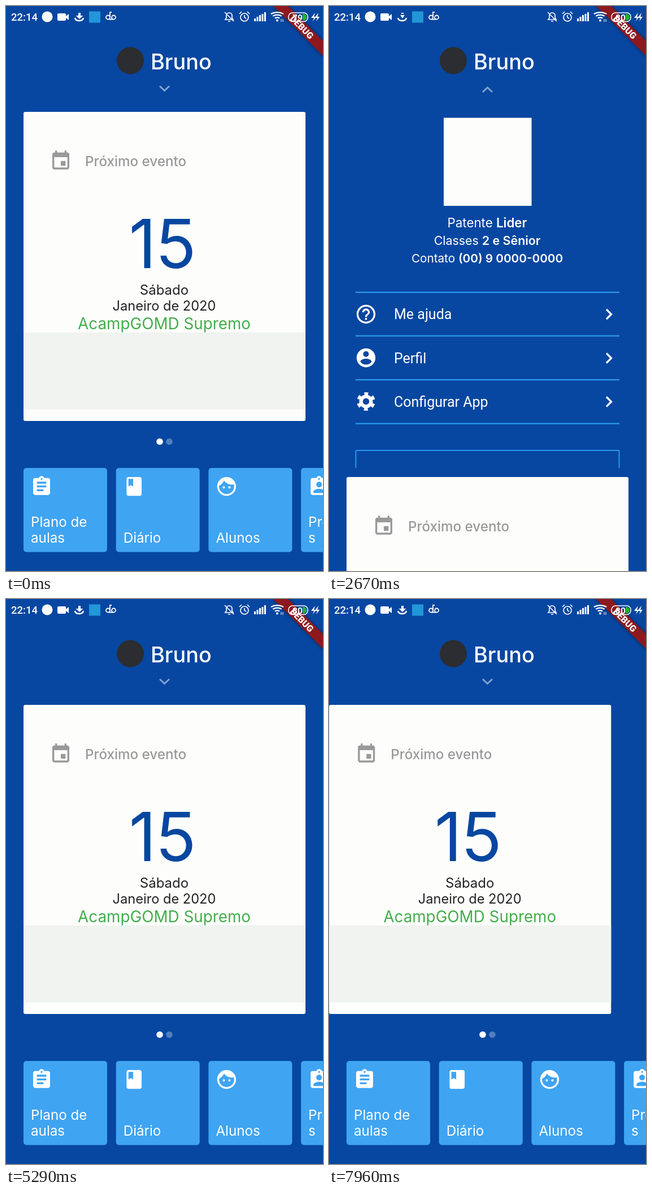
Write an HTML page that moves like this. It is 561x998 px and loops after 8 s.

```html
<!DOCTYPE html>
<html lang="pt-BR">
<head>
<meta charset="utf-8">
<title>Agenda</title>
<style>
  html, body { margin: 0; width: 100%; height: 100%; overflow: hidden; background: #0747a1; }
  svg { display: block; width: 100vw; height: 100vh; }
  text { font-family: Inter, sans-serif; }
  .roboto { font-family: Roboto, sans-serif; }
  .line { fill: none; stroke: #fff; }
  .mid { text-anchor: middle; }
</style>
</head>
<body>
<svg id="stage" viewBox="0 0 561 998"></svg>
<script>
const LOOP = 8000, PAGE = 561, DROP = 645;

const disc = 'M12 2C6.48 2 2 6.48 2 12s4.48 10 10 10 10-4.48 10-10S17.52 2 12 2z';
const clip = 'M19 3h-4.18C14.4 1.84 13.3 1 12 1c-1.3 0-2.4.84-2.82 2H5c-1.1 0-2 .9-2 2v14c0 1.1.9 2 2 2h14c1.1 0 2-.9 2-2V5c0-1.1-.9-2-2-2zm-7 0c.55 0 1 .45 1 1s-.45 1-1 1-1-.45-1-1 .45-1 1-1z';
const paths = {
  event: 'M17 12h-5v5h5v-5zM16 1v2H8V1H6v2H5c-1.1 0-2 .9-2 2v14c0 1.1.9 2 2 2h14c1.1 0 2-.9 2-2V5c0-1.1-.9-2-2-2h-1V1h-2zm3 18H5V8h14v11z',
  money: disc + 'm1.41 16.09V20h-2.67v-1.93c-1.71-.36-3.16-1.46-3.27-3.4h1.96c.1 1.05.82 1.87 2.65 1.87 1.96 0 2.4-.98 2.4-1.59 0-.83-.44-1.61-2.67-2.14-2.48-.6-4.18-1.62-4.18-3.67 0-1.72 1.39-2.84 3.11-3.21V4h2.67v1.95c1.86.45 2.79 1.86 2.85 3.39H14.3c-.05-1.11-.64-1.87-2.22-1.87-1.5 0-2.4.68-2.4 1.64 0 .84.65 1.39 2.67 1.91s4.18 1.39 4.18 3.91c-.01 1.83-1.38 2.83-3.12 3.16z',
  plan: clip + 'm2 14H7v-2h7v2zm3-4H7v-2h10v2zm0-4H7V7h10v2z',
  teacher: clip + 'm0 4c1.66 0 3 1.34 3 3s-1.34 3-3 3-3-1.34-3-3 1.34-3 3-3zm6 12H6v-1.4c0-2 4-3.1 6-3.1s6 1.1 6 3.1V19z',
  book: 'M18 2H6c-1.1 0-2 .9-2 2v16c0 1.1.9 2 2 2h12c1.1 0 2-.9 2-2V4c0-1.1-.9-2-2-2zM6 4h5v8l-2.5-1.5L6 12V4z',
  face: disc + 'm0 18c-4.41 0-8-3.59-8-8 0-.29.02-.58.05-.86 2.36-1.05 4.23-2.98 5.21-5.37C11.07 8.33 14.05 10 17.42 10c.78 0 1.53-.09 2.25-.26.21.71.33 1.47.33 2.26 0 4.41-3.59 8-8 8zM7.75 13a1.25 1.25 0 1 0 2.5 0 1.25 1.25 0 1 0-2.5 0zm6 0a1.25 1.25 0 1 0 2.5 0 1.25 1.25 0 1 0-2.5 0z',
  help: 'M11 18h2v-2h-2v2z' + disc + 'm0 18c-4.41 0-8-3.59-8-8s3.59-8 8-8 8 3.59 8 8-3.59 8-8 8zm0-14c-2.21 0-4 1.79-4 4h2c0-1.1.9-2 2-2s2 .9 2 2c0 2-3 1.75-3 5h2c0-2.25 3-2.5 3-5 0-2.21-1.79-4-4-4z',
  user: disc + 'm0 3c1.66 0 3 1.34 3 3s-1.34 3-3 3-3-1.34-3-3 1.34-3 3-3zm0 14.2c-2.5 0-4.71-1.28-6-3.22.03-1.99 4-3.08 6-3.08 1.99 0 5.97 1.09 6 3.08-1.29 1.94-3.5 3.22-6 3.22z'
};

const rect = (x, y, w, h, fill, r = 0) => `<rect x="${x}" y="${y}" width="${w}" height="${h}" rx="${r}" fill="${fill}"/>`;
const circle = (x, y, r, fill, attrs = '') => `<circle cx="${x}" cy="${y}" r="${r}" fill="${fill}" ${attrs}/>`;
const text = (s, x, y, size, fill = '#fff', attrs = '') => `<text x="${x}" y="${y}" font-size="${size}" fill="${fill}" ${attrs}>${s}</text>`;
const mid = (s, y, size, fill, x = 280) => text(s, x, y, size, fill, 'class="mid"');
const line = (d, width = 2) => `<path class="line" d="${d}" stroke-width="${width}"/>`;
const at = (x, y, body) => `<g transform="translate(${x - 20} ${y - 20}) scale(1.667)">${body}</g>`;
const icon = (name, x, y, fill = '#fff') => at(x, y, `<path fill-rule="evenodd" d="${paths[name]}" fill="${fill}"/>`);
const gear = at(65.5, 698.5,
  '<circle class="line" cx="12" cy="12" r="5.3" stroke-width="3.8"/>' +
  '<circle class="line" cx="12" cy="12" r="8.3" stroke-width="3" stroke-dasharray="4.1 4.59" stroke-dashoffset="-2.3"/>');

const page = (x, bandY, body) => `<g transform="translate(${x})">
  ${rect(31, 187, 499, 546, '#fdfefc', 3)}${rect(31, bandY, 499, 136, '#f1f3f0')}${body}</g>`;

const cardTitle = (s, y) => text(s, 140, y, 24.2, '#999', 'font-weight="500"');

const cards = page(0, 576.5,
    icon('event', 97, 273.7, '#999') + cardTitle('Próximo evento', 283) +
    mid('15', 463, 119, '#0747a1', 277) +
    mid('Sábado', 510, 24, '#222') + mid('Janeiro de 2020', 538, 23.6, '#222') +
    mid('AcampGOMD Supremo', 571, 27.8, '#45ad4c')) +
  page(PAGE, 458, icon('money', 97.5, 392, '#999') + cardTitle('Caixa', 402));

const tile = (i, name, ...label) => {
  const x = 31 + i * 163.7;
  return rect(x, 816, 148, 148.5, '#3fa4f2', 5) + icon(name, x + 32, 848.7) +
    label.map((s, k) => text(s, x + 13, 948 - 28 * (label.length - 1 - k), 24.2)).join('');
};
const tiles = tile(0, 'plan', 'Plano de', 'aulas') + tile(1, 'book', 'Diário') +
  tile(2, 'face', 'Alunos') + tile(3, 'teacher', 'Professore', 's');

const info = (label, value, y, size) => mid(`${label} <tspan font-weight="600">${value}</tspan>`, y, size, '#fff');
const row = (label, art, y) => art + text(label, 115, y + 9, 25, '#fff', 'class="roboto"') +
  line(`M491 ${y - 8}l8.5 8.5-8.5 8.5`, 3.3);
const rule = y => rect(47, y, 467, 2.4, '#2a97ea');

const menu = rect(203, 197.5, 155.5, 155.5, '#fdfefc') +
  '<rect id="glow" x="203" y="197.5" width="155.5" height="33"/>' +
  info('Patente', 'Lider', 391, 22.3) + info('Classes', '2 e Sênior', 422, 21.4) +
  info('Contato', '(00) 9 0000-0000', 453, 20.7) +
  [504.5, 581.5, 659, 736.5].map(rule).join('') +
  row('Me ajuda', icon('help', 65.5, 544.3), 544) +
  row('Perfil', icon('user', 65.5, 621.5), 621.5) +
  row('Configurar App', gear, 698.5) +
  '<path d="M47.5 816V787q0-2 2-2H511.5q2 0 2 2V816" fill="none" stroke="#2a97ea" stroke-width="2"/>';

const bars = [5, 8, 11, 13, 16].map((h, i) => rect(439 + i * 4.5, 27 - h, 3, h, '#fff')).join('');
const arc = r => `M${480 - r * .7} ${26 - r * .75}Q480 ${26 - r * 1.12} ${480 + r * .7} ${26 - r * .75}`;
const status = text('22:14', 9, 26, 18.5, '#fff', 'class="roboto" font-weight="500"') +
  circle(73, 19, 9.5, '#fff') +
  rect(91, 13, 15, 13, '#fff', 2) + '<path d="M106 18l5-4v11l-5-4z" fill="#fff"/>' +
  line('M122 21q1 5 7.5 5t7.5-5', 2.6) +
  '<path id="arrow" fill="#fff"/>' +
  rect(147, 9.5, 20, 20, '#2196d8') +
  line('M184 20a3.5 3.5 0 1 0-7 0 3.5 3.5 0 1 0 7 0M194 20a3.5 3.5 0 1 0-7 0 3.5 3.5 0 1 0 7 0M180 23.5h11M184 20v-9h3', 1.8) +
  line('M388 24h14l-2-3v-5q-1-4-5-4t-5 4v5zM393 27h4M387 11l16 16', 1.7) +
  line('M429 20a7 7 0 1 0-14 0 7 7 0 1 0 14 0M422 16v4l3 2M413 14l4-4M431 14l-4-4', 1.7) +
  bars + line(arc(6) + arc(11) + arc(16), 2.3) + circle(480, 25.5, 2, '#fff') +
  line('M487 23v5m3-5v5', 1) +
  '<rect class="line" x="500" y="12" width="34" height="15.5" rx="7" stroke-width="1.6"/>' +
  '<path d="M525 14h2q5 1 5 5.7t-5 5.7h-2z" fill="#21b526"/>' +
  text('', 507, 25.5, 15.5, '#fff', 'id="charge" class="roboto" font-weight="700"') +
  '<path d="M547 12l-7 9h5l-2 6 6-8h-4zM553 12l-7 9h5l-2 6 6-8h-4z" fill="#fff"/>';

const ribbon = `<g transform="translate(561 0) rotate(45)">
  <rect x="-64" y="43.6" width="128" height="18.7" filter="url(#blur)" opacity=".5"/>
  ${rect(-64, 43.6, 128, 18.7, '#8d191e')}
  ${text('DEBUG', 0, 58.6, 15.9, '#fff', 'class="roboto mid" font-weight="900"')}</g>`;

document.getElementById('stage').innerHTML = `
  <defs><filter id="blur" x="-20%" y="-60%" width="140%" height="220%"><feGaussianBlur stdDeviation="3"/></filter></defs>
  ${rect(0, 0, 561, 998, '#0747a1')}
  ${circle(220, 96.5, 24, '#2b2d31')}
  ${text('Bruno', 256, 112, 37.8, '#fff', 'font-weight="500"')}
  <path id="chevron" class="line" stroke-width="3" opacity=".5"/>
  <g id="menu">${menu}</g>
  <g id="footer">${circle(272, 769.5, 5.8, '#fff', 'id="dot0"')}${circle(289, 769.5, 5.8, '#fff', 'id="dot1"')}${tiles}</g>
  <g id="cards">${cards}</g>
  ${ribbon}${status}`;

const el = Object.fromEntries([...document.querySelectorAll('[id]')].map(e => [e.id, e]));
const clamp = v => Math.max(0, Math.min(1, v));
const ramp = (t, start, length) => clamp((t - start) / length);
const easeOut = p => 1 - (1 - p) ** 3;
const pulse = (t, ease, length) => ease(ramp(t, 2220, length)) - ease(ramp(t, 4790, length));

// Horizontal page position: [time, pixels]
const pan = [[0, 0], [6040, 0], [6200, 45], [6300, 130], [6400, 285], [6500, 430], [6600, 505], [6700, 537],
  [6790, 550], [6900, 558], [7000, 561], [7350, 561], [7500, 480], [7600, 330], [7700, 190], [7800, 100],
  [7900, 48], [7960, 31], [8000, 22]];

function valueAt(keys, t) {
  const i = Math.max(1, keys.findIndex(k => k[0] >= t));
  const [[t0, a], [t1, b]] = [keys[i - 1], keys[i]];
  return a + (b - a) * (t - t0) / (t1 - t0);
}

const arrows = ['M128 12h4v5h4.5l-6.5 6-6.5-6h4.5z', 'M128 12h4v2h-4zM126 16h8l-4 6z'];

function render(t) {
  const shade = pulse(t, p => p, 200);
  const open = t >= 2220 && t < 4790;
  el.cards.setAttribute('transform', `translate(${-valueAt(pan, t)} ${DROP * pulse(t, easeOut, 300)})`);
  el.menu.setAttribute('opacity', shade);
  el.footer.setAttribute('opacity', 1 - shade);
  el.chevron.setAttribute('d', open ? 'M272 152l8.5-8 8.5 8' : 'M272 141.5l8.5 8 8.5-8');
  const second = ramp(t, 6400, 120) - ramp(t, 7640, 120);
  el.dot0.setAttribute('opacity', 1 - .7 * second);
  el.dot1.setAttribute('opacity', .3 + .7 * second);
  el.glow.setAttribute('opacity', .05 * (ramp(t, 4150, 150) - ramp(t, 4430, 200)));
  el.arrow.setAttribute('d', arrows[Math.floor((t + 50) / 200) % 6 === 1 ? 1 : 0]);
  el.charge.textContent = t < 2200 ? '79' : '80';
}

const start = performance.now();
function tick() {
  render((performance.now() - start) % LOOP);
  requestAnimationFrame(tick);
}
tick();
</script>
</body>
</html>
```
